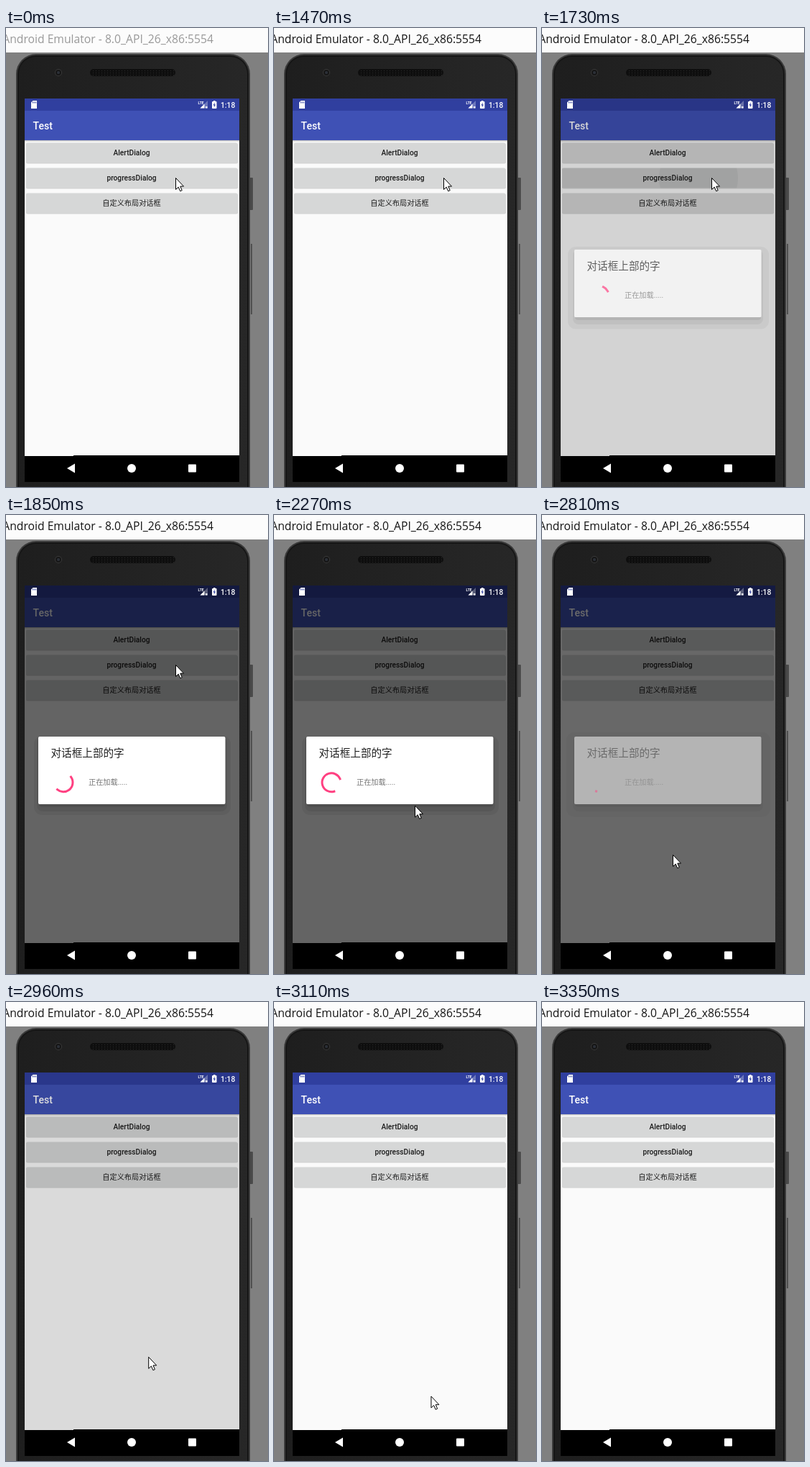
An HTML page with a canvas that plays this animation: 365x638 px, repeating every 3910 ms.

```html
<!DOCTYPE html>
<html lang="zh">
<head>
<meta charset="utf-8">
<style>
  html, body { margin: 0; width: 100%; height: 100%; overflow: hidden; background: #808080; }
  canvas { display: block; }
</style>
</head>
<body>
<canvas id="stage" width="365" height="638"></canvas>
<script>
const ctx = document.getElementById('stage').getContext('2d');
const LOOP = 3910;
const UI = 'Roboto, "Noto Sans CJK SC", "Noto Sans CJK", sans-serif';

const ramp = (t, from, to) => Math.min(1, Math.max(0, (t - from) / (to - from)));
const smooth = s => s * s * (3 - 2 * s);

// cubic-bezier(0.4, 0, 0.2, 1)
function fastOutSlowIn(x) {
  let lo = 0, hi = 1, s = 0;
  for (let i = 0; i < 20; i++) {
    s = (lo + hi) / 2;
    if (1.2 * s * (1 - s) ** 2 + 0.6 * s * s * (1 - s) + s ** 3 < x) lo = s; else hi = s;
  }
  return smooth(s);
}

// The screen refreshes by turns after 120 and 150 ms once something moves.
function refreshTime(t) {
  const since = t - 1460;
  if (since < 0) return 0;
  const pair = since - since % 270;
  return 1460 + pair + (since - pair >= 120 ? 120 : 0);
}

function cursorAt(t) {
  const travel = smooth(ramp(t, 1930, 2440));
  const leaving = Math.max(0, t - 2810);
  return [
    236 - 54 * travel + 0.135 * leaving,
    208 + 264 * travel + 0.091 * leaving + 0.0007 * leaving ** 2
  ];
}

function rect(x, y, w, h, fill, radius = 0) {
  ctx.fillStyle = fill;
  ctx.beginPath();
  ctx.roundRect(x, y, w, h, radius);
  ctx.fill();
}

function disc(x, y, r, fill) {
  ctx.fillStyle = fill;
  ctx.beginPath();
  ctx.arc(x, y, r, 0, 7);
  ctx.fill();
}

function poly(points, fill, stroke) {
  ctx.beginPath();
  points.forEach(([x, y]) => ctx.lineTo(x, y));
  ctx.closePath();
  ctx.fillStyle = fill;
  ctx.fill();
  if (stroke) {
    ctx.strokeStyle = stroke;
    ctx.lineWidth = 1;
    ctx.stroke();
  }
}

function text(str, x, y, size, fill, { align = 'left', weight = 400, family = UI } = {}) {
  ctx.font = `${weight} ${size}px ${family}`;
  ctx.textAlign = align;
  ctx.fillStyle = fill;
  ctx.fillText(str, x, y);
}

function drawTitleBar(active) {
  rect(0, 0, 365, 34, '#fcfcfc');
  text('Android Emulator - 8.0_API_26_x86:5554', 289, 21, 15.7, active ? '#141414' : '#999',
    { align: 'right', family: '"Open Sans", sans-serif' });
}

function drawPhone() {
  rect(339, 208, 5, 45, '#4a4a4a', 1);
  rect(341, 300, 2, 98, '#505050');
  rect(14, 36, 326, 650, '#3a3a3a', 28);
  rect(16, 38, 322, 650, '#161616', 26);
  const body = ctx.createLinearGradient(14, 0, 340, 0);
  body.addColorStop(0, '#1e1e1e');
  body.addColorStop(1, '#272727');
  rect(18, 40, 318, 650, body, 24);
  disc(73, 62, 5, '#3a3a3a');
  disc(73, 62, 4, '#161616');
  disc(73, 62, 2, '#2c3038');
  rect(117, 57, 119, 10, '#0e0e0e', 5);
  for (let x = 121; x < 234; x += 4)
    for (let y = 59; y < 66; y += 3) rect(x, y, 1, 1, '#2b2b2b');
}

function drawStatusIcons() {
  poly([[37.5, 101], [43, 101], [43, 112], [35, 112], [35, 103.5]], '#fff');
  for (let x = 37; x < 42; x += 2) rect(x, 102.5, 1, 2, '#303f9f');
  text('LTE', 267.5, 105.5, 5, '#fff', { weight: 700 });
  poly([[281, 101], [281, 111.5], [270.5, 111.5]], 'rgba(255,255,255,.3)');
  poly([[276.5, 105.5], [276.5, 111.5], [270.5, 111.5]], '#fff');
  rect(278, 109, 2.5, 2.5, '#fff');
  rect(287, 102, 6.5, 10, '#fff', 1);
  rect(289, 101, 2.5, 2, '#fff');
  poly([[290.8, 103.5], [288.5, 107.5], [290, 107.5], [289.7, 110.5], [292, 106.5], [290.5, 106.5]], '#303f9f');
  text('1:18', 299, 111, 10.3, '#fff', { weight: 500 });
}

function drawButton(label, y, ripple) {
  rect(28, y + 0.5, 295, 28, 'rgba(0,0,0,.16)', 2);
  rect(28, y - 0.5, 294.5, 28, '#d6d7d7', 2);
  if (ripple) {
    ctx.save();
    ctx.beginPath();
    ctx.rect(28, y - 0.5, 294.5, 28);
    ctx.clip();
    rect(28, y - 0.5, 295, 28, 'rgba(0,0,0,.06)');
    disc(237 - ripple * 0.345, y + 13.5, ripple, 'rgba(0,0,0,.05)');
    ctx.restore();
  }
  text(label, 175, y + 17.3, 10.2, '#1c1c1c', { align: 'center', weight: 500 });
}

function drawApp(dim, ripple) {
  rect(26, 98, 299, 497, '#fafafa');
  rect(26, 156, 299, 2, 'rgba(0,0,0,.1)');
  rect(26, 156, 299, 1, 'rgba(0,0,0,.12)');
  rect(26, 98, 299, 17, '#303f9f');
  rect(26, 115, 299, 41, '#3f51b5');
  text('Test', 37.5, 141, 14, '#fff', { weight: 500 });
  ['AlertDialog', 'progressDialog', '自定义布局对话框'].forEach((label, i) =>
    drawButton(label, 160 + 35 * i, i === 1 && ripple));
  rect(26, 98, 299, 497, `rgba(0,0,0,${dim})`);
  drawStatusIcons();
  rect(26, 595, 299, 36, '#000');
  rect(94, 594, 231, 1, '#000');
  poly([[85, 612], [96, 605.5], [96, 618.5]], '#fff');
  disc(175, 612, 6, '#fff');
  rect(254, 606.5, 11, 11, '#fff', 1);
}

function drawSpinner(t) {
  const phase = (t - 1605) / 1220;
  const turn = -36 + (t - 1850) * 0.246;
  const angle = p => (turn + 270 * fastOutSlowIn(p)) * Math.PI / 180;
  ctx.beginPath();
  ctx.arc(80, 371.8, 13, angle(phase * 2 - 1), angle(phase * 2));
  ctx.lineWidth = 3;
  ctx.lineCap = 'square';
  ctx.strokeStyle = '#ff4081';
  ctx.stroke();
}

function drawDialog(t, opacity) {
  ctx.save();
  ctx.globalAlpha = opacity;

  // The shadow shows only outside the panel.
  ctx.save();
  ctx.beginPath();
  ctx.rect(0, 0, 365, 638);
  ctx.rect(45, 308, 260.5, 94);
  ctx.clip('evenodd');
  const spread = 10 * (1 - opacity);
  rect(39 - spread, 307 - spread, 274 + spread * 2, 110 + spread * 1.5, 'rgba(0,0,0,.06)', 11);
  rect(43, 308, 265, 104, 'rgba(0,0,0,.07)', 8);
  rect(46, 309, 259, 97, 'rgba(0,0,0,.09)', 4);
  ctx.restore();

  rect(45, 308, 260.5, 94, '#fff', 2);
  text('对话框上部的字', 62.5, 336, 14.6, '#212121');
  text('正在加载.....', 115, 375, 10.2, '#757575');
  drawSpinner(t);
  ctx.restore();
}

function drawCursor([x, y]) {
  const arrow = [[0, 0], [0, 16], [3.7, 12.6], [6.2, 18.3], [8.7, 17.2], [6.3, 11.6], [11, 11.6]];
  poly(arrow.map(([dx, dy]) => [x + 0.5 + dx, y + 0.5 + dy]), '#fff', '#000');
}

function draw(now) {
  const clock = now % LOOP;
  const t = refreshTime(clock);
  const dim = 0.6 * (ramp(t, 1687, 1850) - ramp(t, 2805, 2965));
  const dialog = t < 1700 ? 0 : ramp(t, 1520, 1820) - ramp(t, 2700, 2920);
  const ripple = t >= 1580 && t < 1850 ? 24 + (t - 1580) * 0.207 : 0;

  rect(0, 0, 365, 638, '#808080');
  drawTitleBar(clock >= 1470);
  drawPhone();
  drawApp(dim, ripple);
  if (dialog > 0) drawDialog(t, dialog);
  drawCursor(cursorAt(t));
}

const start = performance.now();
function loop() {
  draw(performance.now() - start);
  requestAnimationFrame(loop);
}
loop();
</script>
</body>
</html>
```
